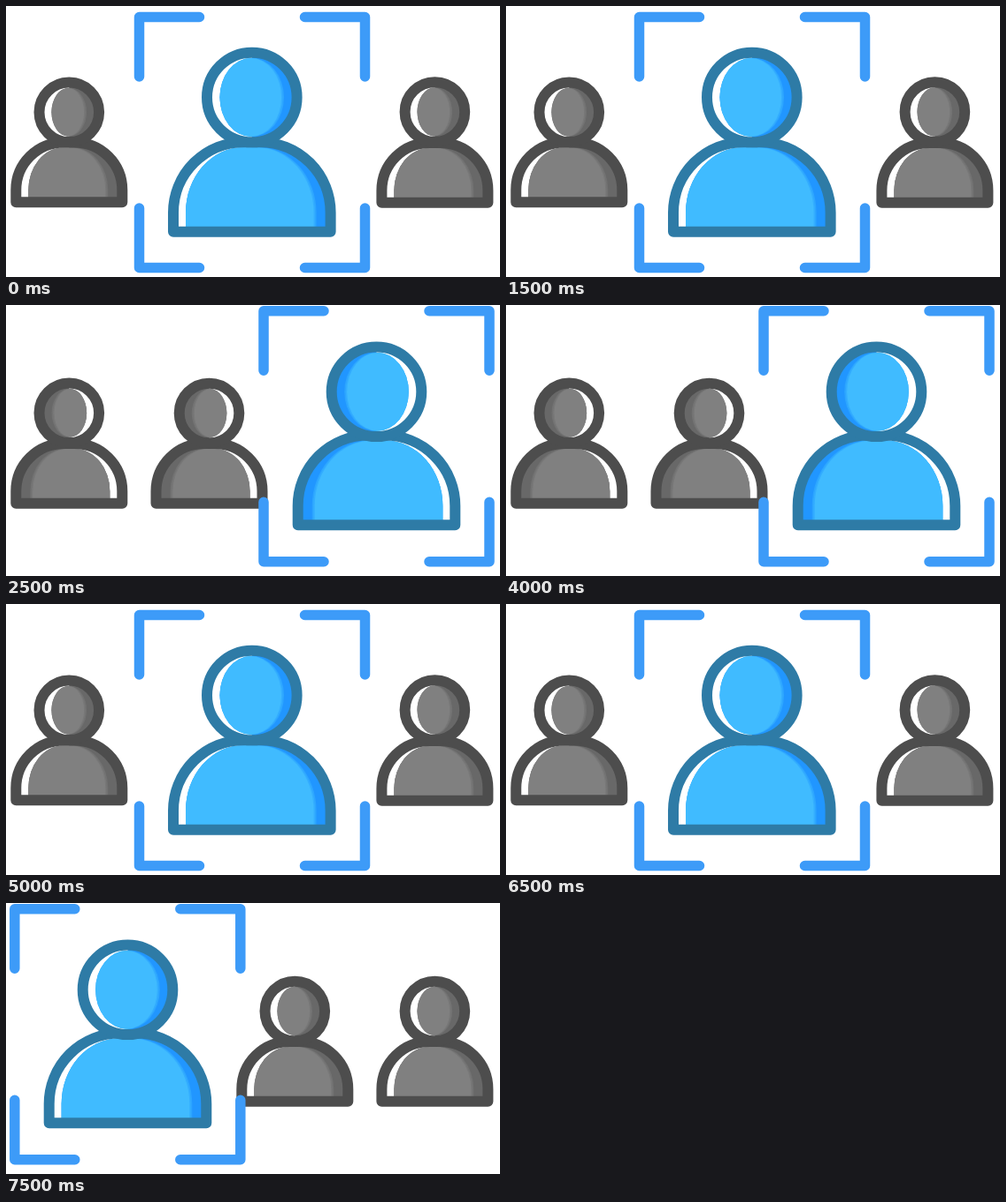
Animation of 558 by 307 pixels, one loop 10 s. Source, as an HTML page with a canvas:

```html
<!DOCTYPE html>
<html lang="en">
<head>
<meta charset="utf-8">
<title>Selecting a person</title>
<style>
html, body { margin: 0; width: 100%; height: 100%; overflow: hidden; background: #fff; }
canvas { display: block; }
</style>
</head>
<body>
<canvas id="stage" width="558" height="307"></canvas>
<script>
const ctx = document.getElementById('stage').getContext('2d');
const STEP = 2500;

const BLUE = { line: '#2e7ba6', fill: '#40bbff', shade: '#2196ff', head: 50.8, gap: 8.5, halfWidth: 88.8, height: 101.6, weight: 12 };
const GRAY = { line: '#4d4d4d', fill: '#808080', shade: '#686868', head: 33.8, gap: 8, halfWidth: 60, height: 67.8, weight: 12 };

function ellipse(x, y, rx, ry) {
  ctx.beginPath();
  ctx.ellipse(x, y, rx, ry, 0, 0, Math.PI * 2);
}

function dome(left, right, top, bottom, rx, ry) {
  ctx.beginPath();
  ctx.moveTo(left, bottom);
  ctx.lineTo(left, top + ry);
  ctx.ellipse(left + rx, top + ry, rx, ry, 0, Math.PI, Math.PI * 1.5);
  ctx.lineTo(right - rx, top);
  ctx.ellipse(right - rx, top + ry, rx, ry, 0, -Math.PI / 2, 0);
  ctx.lineTo(right, bottom);
  ctx.closePath();
}

// White glint on the left, shade on the right, soft edge towards the shade.
function shaded(style, outline, core) {
  ctx.save();
  outline();
  ctx.clip();
  ctx.fillStyle = '#fff';
  ctx.fillRect(-120, 0, 240, 307);
  ctx.fillStyle = style.shade;
  core(0);
  ctx.fill();
  ctx.fillRect(0, 0, 120, 307);
  ctx.fillStyle = style.fill;
  for (const inset of [0, 1.5, 3]) {
    ctx.globalAlpha = inset === 3 ? 1 : 0.4;
    core(inset);
    ctx.fill();
  }
  ctx.restore();
  ctx.strokeStyle = style.line;
  ctx.lineWidth = style.weight;
  ctx.lineJoin = 'round';
  outline();
  ctx.stroke();
}

function person(style, x, headY, baseY, flip) {
  const { head, gap, halfWidth: w, height, weight } = style;
  const top = baseY - height, r = w * 0.9, half = weight / 2;
  const coreLeft = -w + half + 8, coreRight = w - half - 10;
  const rx = (coreRight - coreLeft) * 0.44;
  const inner = head - half;

  ctx.save();
  ctx.translate(x, 0);
  if (flip) ctx.scale(-1, 1);
  shaded(style,
    () => dome(-w, w, top, baseY, r, r),
    inset => dome(coreLeft, coreRight - inset, top + half, baseY, rx, r - half));
  shaded(style,
    () => ellipse(0, headY, head, head),
    inset => ellipse(-inset / 2, headY, inner - gap - inset / 2, inner - 0.4));
  ctx.restore();
}

function brackets(left, top) {
  const right = left + 255, bottom = top + 284, arm = 68;
  ctx.strokeStyle = '#3d9bf8';
  ctx.lineWidth = 11.5;
  ctx.lineCap = ctx.lineJoin = 'round';
  for (const [x, sx] of [[left, 1], [right, -1]]) {
    for (const [y, sy] of [[top, 1], [bottom, -1]]) {
      ctx.beginPath();
      ctx.moveTo(x + arm * sx, y);
      ctx.lineTo(x, y);
      ctx.lineTo(x, y + (arm - 0.5) * sy);
      ctx.stroke();
    }
  }
}

function centre() {
  person(GRAY, 71.3, 120.3, 222.2, false);
  person(GRAY, 484.4, 120, 222.8, false);
  person(BLUE, 277.8, 103.5, 255.8, false);
  brackets(150.5, 12.5);
}

function right() {
  person(GRAY, 71.3, 122.3, 224.8, true);
  person(GRAY, 229.5, 122.5, 224.8, true);
  person(BLUE, 418.5, 98.3, 249.2, true);
  brackets(291, 6.7);
}

function left() {
  person(GRAY, 326.3, 122.5, 224.8, false);
  person(GRAY, 484.4, 122.5, 224.8, false);
  person(BLUE, 137.5, 98.3, 249.2, false);
  brackets(9.8, 6.7);
}

const scenes = [centre, right, centre, left];

function draw() {
  const i = Math.floor(performance.now() / STEP) % scenes.length;
  ctx.fillStyle = '#fff';
  ctx.fillRect(0, 0, 558, 307);
  scenes[i]();
  requestAnimationFrame(draw);
}
draw();
</script>
</body>
</html>
```
